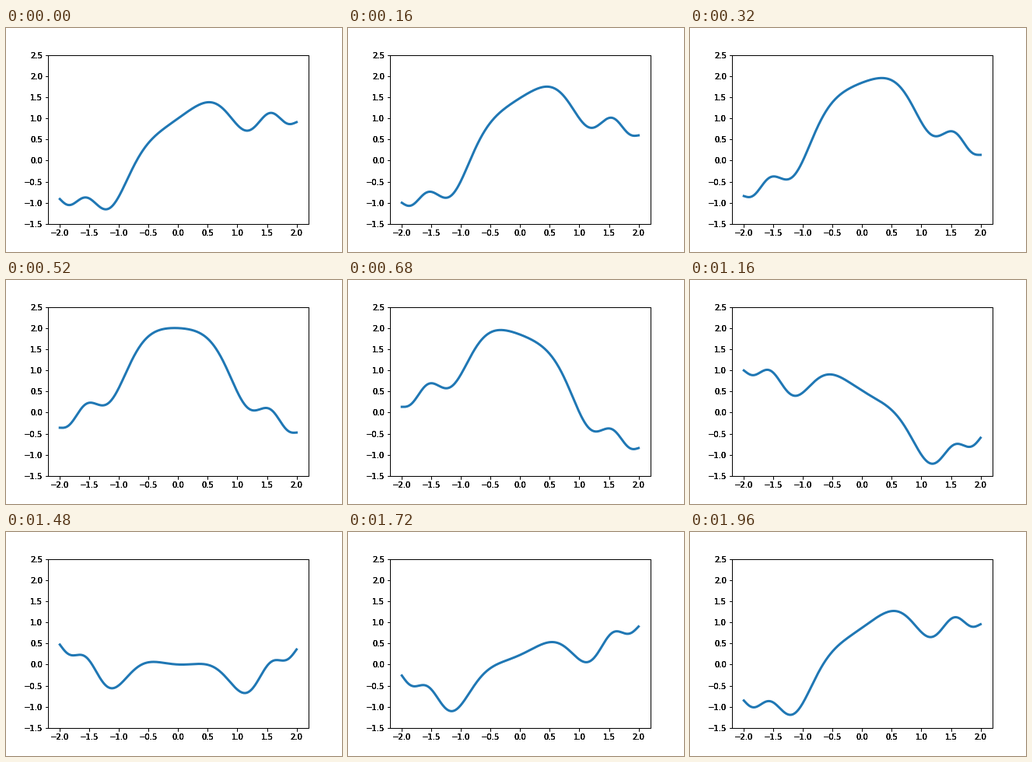
A matplotlib script for the animation above (2 s loop, 432 px wide and 288 px high).

```python
import numpy as np
import matplotlib.pyplot as plt
from matplotlib.animation import FuncAnimation

FRAMES = 50
INTERVAL = 40
BOX = [0.125, 0.125, 0.775, 0.755]
PASSES = 4  # stacked axes give the heavy, dark tick labels

plt.rcParams.update({"font.family": "DejaVu Sans", "font.size": 10})
fig = plt.figure(figsize=(6, 4), dpi=72, facecolor="white")


def make_axes():
    ax = fig.add_axes(BOX, facecolor="none")
    ax.set(xlim=(-2.2, 2.2), ylim=(-1.5, 2.5),
           xticks=np.arange(-2, 2.1, 0.5), yticks=np.arange(-1.5, 2.6, 0.5))
    ax.xaxis.set_major_formatter("{x:.1f}")
    ax.yaxis.set_major_formatter("{x:.1f}")
    return ax


def wave(x, phase):
    return np.sin(x + phase) + np.sinc(x ** 2)


ax = [make_axes() for _ in range(PASSES)][-1]
x = np.linspace(-2, 2, 400)
line, = ax.plot(x, wave(x, 0), color="tab:blue", lw=3)


def update(i):
    line.set_ydata(wave(x, 2 * np.pi * i / FRAMES))
    return line,


anim = FuncAnimation(fig, update, frames=FRAMES, interval=INTERVAL,
                     repeat=True, repeat_delay=0)
plt.show()
```
